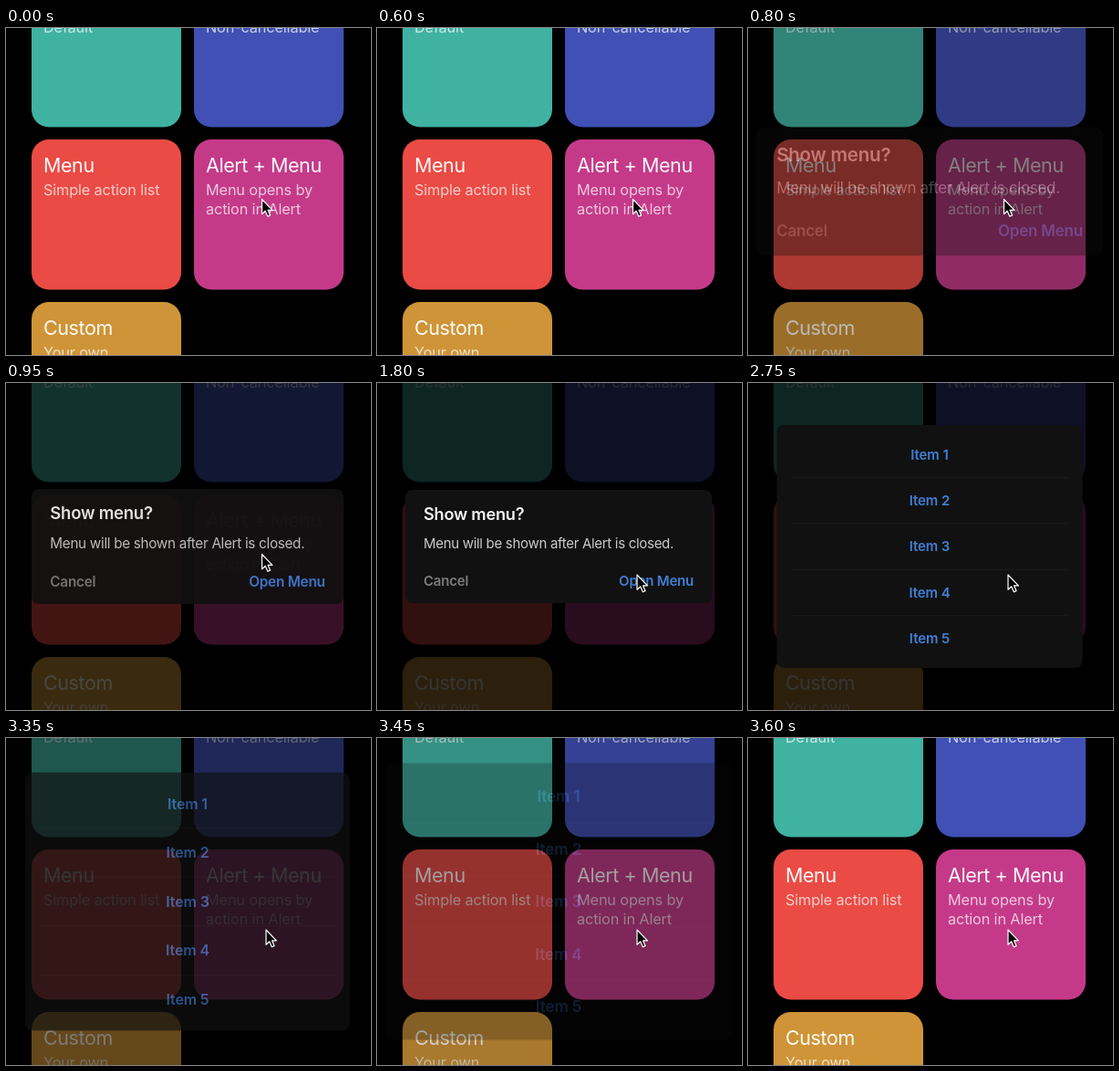
Animation of 400x358 px, one loop 3.65 s. Source, as an HTML page:

```html
<!DOCTYPE html>
<html lang="en">
<head>
<meta charset="utf-8">
<title>Alert and menu</title>
<style>
  html, body { margin: 0; width: 100%; height: 100%; overflow: hidden; background: #000; }
  svg { display: block; width: 400px; height: 358px; font-family: Inter, "Liberation Sans", sans-serif; }
  .title { font-size: 21.5px; letter-spacing: -.42px; fill: #fff; fill-opacity: .96; }
  .sub { font-size: 16.3px; letter-spacing: -.15px; fill: #fff; fill-opacity: .72; }
  .head { font-size: 18.2px; font-weight: 600; letter-spacing: -.25px; fill: #f4f4f4; }
  .body { font-size: 15px; letter-spacing: -.3px; fill: #cbcbcb; }
  .button { font-size: 15px; font-weight: 600; letter-spacing: -.2px; fill: #417fd6; }
  .cancel { fill: #7c7c7c; }
  .item { letter-spacing: -.1px; text-anchor: middle; }
</style>
</head>
<body>
<svg viewBox="0 0 400 358">
  <rect width="400" height="358"/>
  <g id="cards"></g>
  <rect id="dim" width="400" height="358" opacity="0"/>
  <g id="alert" opacity="0">
    <rect x="31" y="117" width="336" height="124" rx="8" fill="#111"/>
    <text class="head" x="51" y="150">Show menu?</text>
    <text class="body" x="51" y="181">Menu will be shown after Alert is closed.</text>
    <text class="button cancel" x="51" y="222">Cancel</text>
    <text class="button" x="347" y="222" text-anchor="end">Open Menu</text>
  </g>
  <g id="menu" opacity="0">
    <rect x="31.5" y="46" width="335" height="266" rx="8" fill="#111"/>
  </g>
  <path id="cursor" d="M0 0V16.2L3.7 12.8L6.3 18.8L9 17.6L6.5 11.8H11.4Z"
        fill="#000" stroke="#fff" stroke-width="1.2" stroke-linejoin="round"/>
</svg>
<script>
const LOOP = 3650, STEP = 50, FADE = 360;
const CX = 199, CY = 179;
const byId = id => document.getElementById(id);
const cards = byId('cards'), dim = byId('dim'), alertBox = byId('alert');
const menu = byId('menu'), cursor = byId('cursor');

function add(parent, tag, attrs, text) {
  const el = document.createElementNS('http://www.w3.org/2000/svg', tag);
  for (const key in attrs) el.setAttribute(key, attrs[key]);
  if (text) el.textContent = text;
  parent.append(el);
}

// column, row, colour, title, subtitle lines
[
  [0, 0, '#40b2a2', '', ['Default']],
  [1, 0, '#4050b5', '', ['Non-cancellable']],
  [0, 1, '#ea4b45', 'Menu', ['Simple action list']],
  [1, 1, '#c43a89', 'Alert + Menu', ['Menu opens by', 'action in Alert']],
  [0, 2, '#cf9437', 'Custom', ['Your own']]
].forEach(([col, row, fill, title, lines]) => {
  const x = 28 + col * 178, y = -56 + row * 178;
  add(cards, 'rect', { x, y, width: 164, height: 164.5, rx: 19, fill });
  if (title) add(cards, 'text', { class: 'title', x: x + 13, y: y + 36 }, title);
  lines.forEach((line, i) =>
    add(cards, 'text', { class: 'sub', x: x + 13, y: y + 61 + i * 20.5 }, line));
});

for (let i = 0; i < 5; i++) {
  const y = CY + (i - 2) * 50.4;
  add(menu, 'text', { class: 'button item', x: CX, y: y + 5.4 }, 'Item ' + (i + 1));
  if (i) add(menu, 'rect', { x: 47, y: y - 25.5, width: 304, height: .8, fill: '#fff', opacity: .05 });
}

function ease(t, start, length) {
  const k = Math.min(1, Math.max(0, (t - start) / length));
  return (1 - Math.cos(Math.PI * k)) / 2;
}

function showDialog(el, t, open, close) {
  const enter = ease(t, open, FADE), leave = ease(t, close, FADE);
  const scale = 1 + .2 * (1 - enter) + .18 * leave;
  el.setAttribute('opacity', enter * (1 - leave));
  el.setAttribute('transform',
    `translate(${CX} ${CY}) scale(${scale}) translate(${-CX} ${-CY})`);
}

function draw(now) {
  const t = Math.floor((now % LOOP) / STEP) * STEP;
  dim.setAttribute('opacity', .79 * (ease(t, 660, FADE) - ease(t, 3205, FADE)));
  showDialog(alertBox, t, 660, 1790);
  showDialog(menu, t, 2200, 3205);
  const move = ease(t, 1050, 450);
  cursor.setAttribute('transform', `translate(${280.5 + 4.5 * move} ${187.5 + 22.5 * move})`);
}

const start = performance.now();
function tick() {
  draw(performance.now() - start);
  requestAnimationFrame(tick);
}
tick();
</script>
</body>
</html>
```
